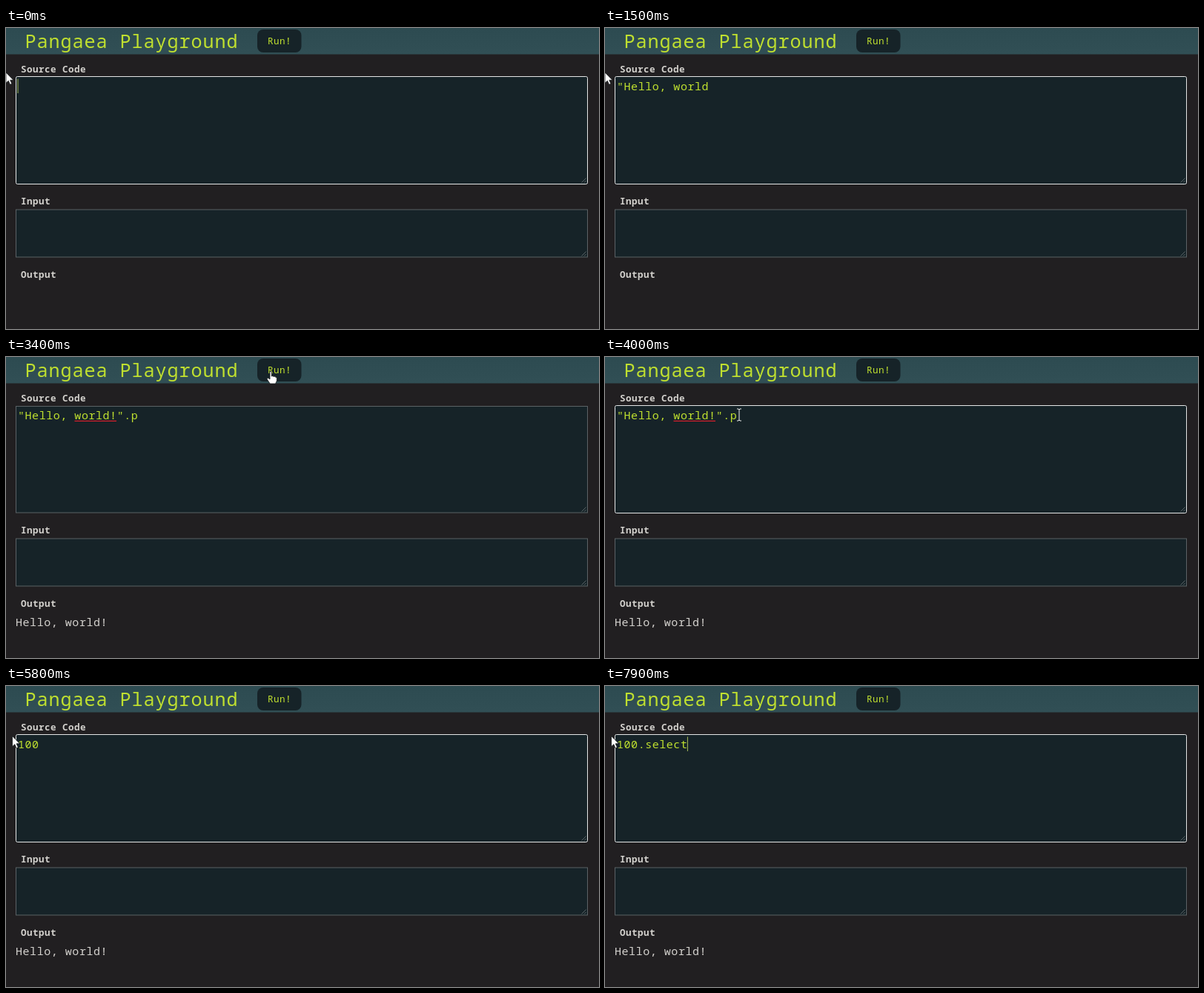
Write an HTML page that moves like this. It is 800 px wide and 406 px high and loops after 8 s.

```html
<!DOCTYPE html>
<html lang="en">
<head>
<meta charset="utf-8">
<title>Pangaea Playground</title>
<style>
  html, body { margin: 0; width: 100%; height: 100%; overflow: hidden; background: #211f21; }
  svg { display: block; }
  text { font-family: "Noto Sans Mono", "DejaVu Sans Mono", monospace; letter-spacing: .035em; white-space: pre; }
  .title { font-size: 25.2px; font-weight: 500; fill: #c0e02f; }
  .run { font-size: 12.6px; fill: #c0e02f; }
  .label { font-size: 12.6px; font-weight: 600; fill: #d3d1cd; }
  .code { font-size: 15.04px; fill: #bfe02f; }
  .out { fill: #d3d1cd; }
  .field { fill: #162328; stroke: #5b6265; }
  .grip { stroke: #6d7578; fill: none; stroke-width: .8; }
</style>
</head>
<body>
<svg width="800" height="406" viewBox="0 0 800 406">
  <defs>
    <linearGradient id="bar" x2="0" y2="1">
      <stop stop-color="#2d4b51"/><stop offset="1" stop-color="#314f55"/>
    </linearGradient>
  </defs>
  <rect width="800" height="406" fill="#211f21"/>
  <rect width="800" height="35.5" fill="url(#bar)"/>
  <text class="title" x="25.5" y="27">Pangaea Playground</text>
  <rect x="339" y="2" width="59.5" height="31" rx="8" fill="#162328"/>
  <text class="run" x="353" y="22">Run!</text>

  <text class="label" x="20" y="59.5">Source Code</text>
  <rect id="source" class="field" x="13.5" y="66.5" width="771" height="143.5"/>
  <path class="grip" d="M776.5 208.5l6-6M780 208.5l2.5-2.5"/>
  <text class="label" x="20" y="238">Input</text>
  <rect class="field" x="13.5" y="245" width="771" height="64"/>
  <path class="grip" d="M776.5 307.5l6-6M780 307.5l2.5-2.5"/>
  <text class="label" x="20" y="337">Output</text>

  <rect id="select" y="68.5" height="19.5" fill="#0a63cf"/>
  <text class="code" x="16" y="84"><tspan id="plain"></tspan><tspan id="picked" fill="#fff"></tspan></text>
  <path id="spell" d="M92.5 86.3H149" stroke="#d3202b" stroke-width="1.3"/>
  <rect id="caret" y="68.5" width="1" height="19.5" fill="#a9bd5a"/>
  <text id="output" class="code out" x="13" y="363">Hello, world!</text>

  <g id="pointer" stroke-linejoin="round">
    <path id="arrow" d="M0 0V14.2L3.3 11.2L5.5 16.3L7.9 15.2L5.7 10.3H10Z" fill="#fff" stroke="#15181a" stroke-width=".8"/>
    <path id="hand" d="M-1 1Q0 -.8 1.3 1V7Q3.2 5.8 4 7.4Q6 6.5 6.6 8.2Q8.4 7.8 8.4 9.8V13L6.6 17H-.8L-5 10.8Q-4.2 8.3-1 11Z" fill="#fff" stroke="#15181a" stroke-width=".8"/>
    <path id="beam" d="M-3-8H-1L0-7L1-8H3M0-7V7M-3 8H-1L0 7L1 8H3" fill="none" stroke="#eee"/>
  </g>
</svg>
<script>
const LOOP = 8000, STEP = 100, LEFT = 16, PITCH = 9.54, BLINK = 500;
const CLICK = 3200, GRAB = 4100, REPLACE = 5100;
const el = id => document.getElementById(id);
const show = (id, on) => el(id).style.display = on ? "" : "none";
const put = (id, attrs) => Object.entries(attrs).forEach(([k, v]) => el(id).setAttribute(k, v));

// Text, time of the first key, time between keys, text already there
const bursts = [
  ['"Hello, world!".p', 300, 100, ""],
  ["100", REPLACE, 200, ""],
  [".select", 6200, 200, "100"]
];
// Time, x, y
const path = [
  [0, 0, 60], [2700, 0, 60], [3100, 357, 19], [3600, 357, 19],
  [4000, 181, 78], [GRAB, 181, 78], [4500, 8.5, 67.5], [LOOP, 8.5, 67.5]
];

function typed(t) {
  let text = "", last = -BLINK;
  for (const [keys, start, gap, before] of bursts) {
    if (t < start) break;
    const n = Math.min(keys.length, Math.floor((t - start) / gap) + 1);
    text = before + keys.slice(0, n);
    last = start + (n - 1) * gap;
  }
  return { text, last };
}

function pointerAt(t) {
  const i = path.findIndex(p => t < p[0]);
  const [t0, x0, y0] = path[i - 1], [t1, x1, y1] = path[i];
  const u = (t - t0) / (t1 - t0), k = u * u * (3 - 2 * u);
  return [x0 + (x1 - x0) * k, y0 + (y1 - y0) * k];
}

function draw(t) {
  const { text, last } = typed(t), [x, y] = pointerAt(t);
  const focus = t < CLICK || t >= 4000;
  const selecting = t >= GRAB && t < REPLACE;
  const end = text.length;
  const from = selecting ? Math.max(0, Math.min(end, Math.round((x - LEFT) / PITCH))) : end;

  el("plain").textContent = text.slice(0, from);
  el("picked").textContent = text.slice(from);
  put("select", { x: LEFT + from * PITCH, width: (end - from) * PITCH });
  put("caret", { x: LEFT - .5 + end * PITCH });
  // The caret hides on a key press, then blinks
  show("caret", focus && !selecting && Math.floor((t - last) / BLINK) % 2 === 1);
  show("spell", t >= CLICK && t < REPLACE);
  show("output", t >= CLICK);
  put("source", focus
    ? { y: 65.5, height: 145, rx: 2, style: "stroke:#e4e6e6" }
    : { y: 66.5, height: 143.5, rx: 0, style: "" });

  const hand = x > 339 && x < 398 && y < 33;
  const beam = x > 13 && x < 785 && y > 66 && y < 210;
  show("hand", hand);
  show("beam", beam);
  show("arrow", !hand && !beam);
  put("pointer", { transform: `translate(${x} ${y})` });
}

const begin = performance.now();
function tick() {
  const t = (performance.now() - begin) % LOOP;
  draw(Math.floor(t / STEP) * STEP);
  requestAnimationFrame(tick);
}
tick();
</script>
</body>
</html>
```
